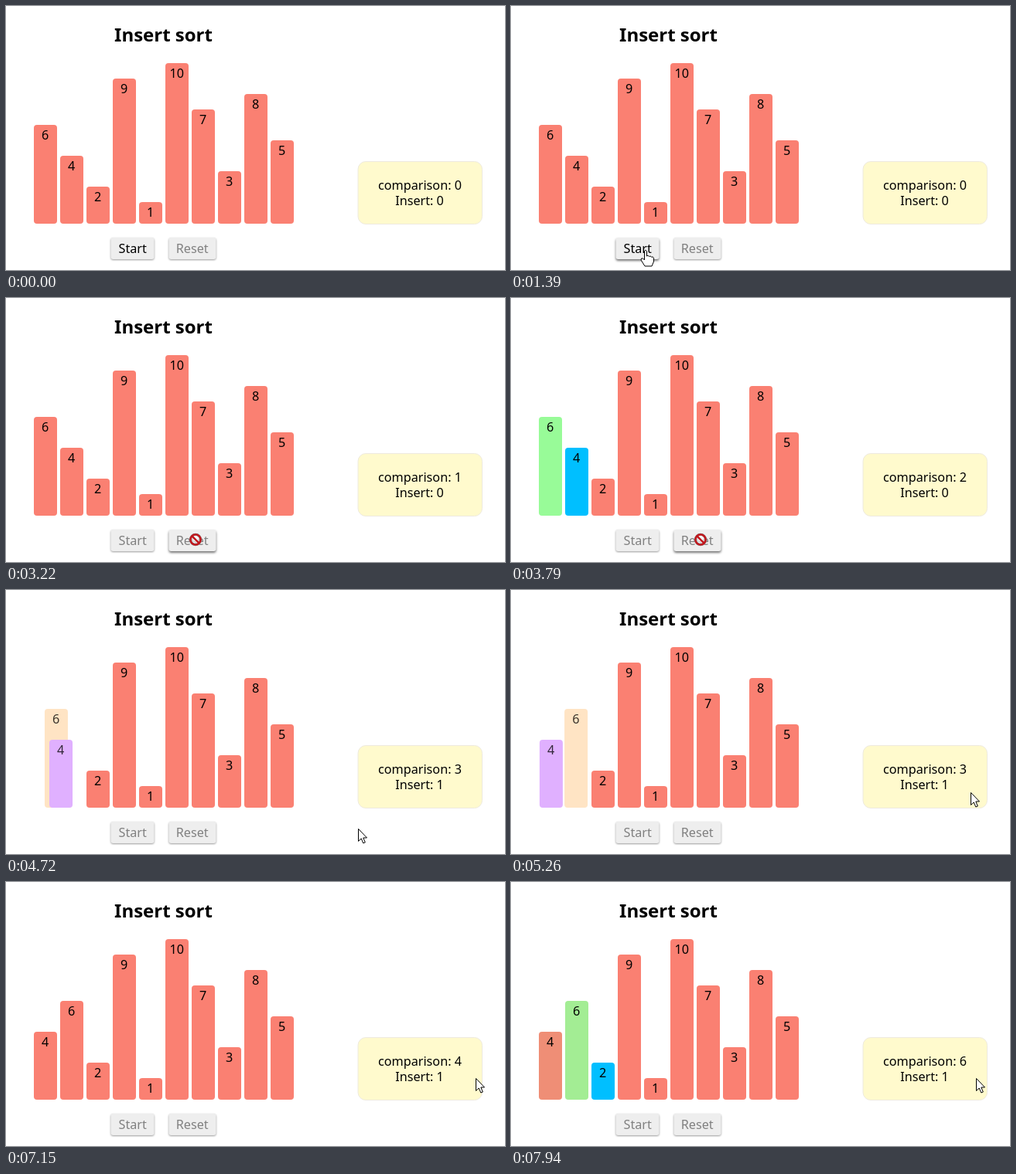
An HTML page for the animation above (8 s loop, 645x342 px).

```html
<!DOCTYPE html>
<html lang="en">
<head>
<meta charset="utf-8">
<title>Insert sort</title>
<style>
  html, body { margin: 0; width: 100%; height: 100%; overflow: hidden; background: #fff; }
  svg { display: block; }
  text { font: 16.2px "Noto Sans", "Open Sans", sans-serif; text-anchor: middle; }
  .title { font-size: 24px; font-weight: bold; }
  .button rect { fill: #eee; filter: drop-shadow(0 1px 1px rgba(0, 0, 0, .4)); }
  .button.hover rect { filter: drop-shadow(0 2px 1.5px rgba(0, 0, 0, .55)); }
  .button text { fill: #808080; }
  .button.enabled text { fill: #000; }
</style>
</head>
<body>
<svg width="645" height="342" viewBox="0 0 645 342">
  <text class="title" x="203.5" y="46">Insert sort</text>
  <g id="bars"></g>
  <g class="button" id="start"><rect x="135.5" y="300" width="56" height="28" rx="3"/><text x="163.7" y="320">Start</text></g>
  <g class="button" id="reset"><rect x="210.5" y="300" width="61" height="28" rx="3"/><text x="240.7" y="320">Reset</text></g>
  <rect x="455" y="201.5" width="160.5" height="81" rx="10" fill="#fffacd" stroke="#eeeade"/>
  <text id="comparison" x="535" y="238"></text>
  <text id="insert" x="534.5" y="258"></text>
  <g id="cursor">
    <path id="arrow" d="M.5 .5V16.5L4.2 13L6.8 19L9.3 18L6.8 12H11.5Z" fill="#fff" stroke="#000"/>
    <path id="hand" d="M-1.5 1.5Q0-1 1.5 1.5V8Q3 6 4.5 8.5Q6 7 7.5 9.2Q9.5 8 10.5 10.5V15L8 21H-1L-6 13Q-6 10-3.5 11L-1.5 13Z" fill="#fff" stroke="#000"/>
    <g id="blocked" fill="none" stroke="#c4161c" stroke-width="2.4">
      <circle r="6.6" fill="#fff" fill-opacity=".6" stroke="#888" stroke-width="3.2"/>
      <circle r="6.6"/>
      <path d="M-4.6-4.6L4.6 4.6"/>
    </g>
  </g>
</svg>
<script>
const LOOP = 8000, FADE = 250, SWAP = 4470, SWAP_TIME = 1000, CLICK = 2210, INSERT = 3890;
const values = [6, 4, 2, 9, 1, 10, 7, 3, 8, 5];
const compareTimes = [CLICK, 3455, INSERT, 6305, 7390, 7940];

const salmon = [250, 128, 114, 1], green = [152, 251, 152, 1], blue = [0, 191, 255, 1];
// The fourth component is the strength of the label.
const peach = [255, 228, 196, .78], lilac = [224, 176, 255, .78];

const fades = {
  6: [[CLICK, green], [2930, salmon], [3455, green], [INSERT, peach], [5715, salmon],
      [6305, green], [6850, salmon], [7390, green], [7913, salmon]],
  4: [[CLICK, blue], [2930, salmon], [3455, blue], [INSERT, lilac], [5715, salmon], [7913, green]],
  2: [[6305, blue], [6850, salmon], [7390, blue]]
};

// time, x, y
const path = [
  [1060, 171, 345], [1200, 176, 306], [1390, 174, 316], [2910, 174, 316], [3220, 245, 313],
  [3790, 245, 313], [4120, 330, 314], [4360, 330, 314], [4720, 455, 309], [5140, 582, 270],
  [5260, 594, 262], [6310, 594, 262], [6470, 610, 238], [6700, 624, 222], [7090, 609, 252],
  [7400, 600, 264], [7720, 601, 254]
];

const $ = id => document.getElementById(id);
const clamp = v => Math.min(1, Math.max(0, v));
const mix = (a, b, p) => a.map((v, i) => v + (b[i] - v) * p);

// CSS "ease": cubic-bezier(.25, .1, .25, 1)
function ease(t) {
  if (t <= 0 || t >= 1) return clamp(t);
  const bezier = (s, a, b) => 3 * a * s * (1 - s) ** 2 + 3 * b * s * s * (1 - s) + s ** 3;
  let lo = 0, hi = 1;
  for (let i = 0; i < 24; i++) {
    const mid = (lo + hi) / 2;
    if (bezier(mid, .25, .25) < t) lo = mid; else hi = mid;
  }
  return bezier(lo, .1, 1);
}

function colorAt(value, t) {
  return (fades[value] || []).reduce(
    (color, [time, next]) => mix(color, next, ease((t - time) / FADE)), salmon);
}

function cursorAt(t) {
  const i = path.findIndex(p => p[0] > t);
  if (i === 0) return [-50, -50];
  if (i < 0) return path[path.length - 1].slice(1);
  const a = path[i - 1], b = path[i];
  return mix(a, b, (t - a[0]) / (b[0] - a[0])).slice(1);
}

$("bars").innerHTML = values.map(v => {
  const h = 20 * v + 8, top = 282 - h;
  return `<g><rect y="${top}" width="30" height="${h}" rx="4"/><text x="14.7" y="${top + 19}">${v}</text></g>`;
}).join("");
const bars = [...$("bars").children];

function drawCursor(t) {
  const [x, y] = cursorAt(t);
  const inside = (left, right) => x > left && x < right && y > 300 && y < 328;
  const onStart = inside(135, 192), onReset = inside(210, 272);
  const shape = !onStart && !onReset ? "arrow" : onStart && t < CLICK ? "hand" : "blocked";
  $("cursor").setAttribute("transform", `translate(${Math.round(x)} ${Math.round(y)})`);
  for (const id of ["arrow", "hand", "blocked"]) $(id).style.display = id === shape ? "" : "none";
  $("start").classList.toggle("hover", onStart);
  $("reset").classList.toggle("hover", onReset);
}

function draw(t) {
  const shift = 34 * ease((t - SWAP) / SWAP_TIME);
  bars.forEach((bar, i) => {
    const [r, g, b, label] = colorAt(values[i], t);
    const x = 36 + 34 * i + (i === 0 ? shift : i === 1 ? -shift : 0);
    bar.setAttribute("transform", `translate(${x} 0)`);
    bar.firstChild.setAttribute("fill", `rgb(${r}, ${g}, ${b})`);
    bar.lastChild.setAttribute("fill-opacity", label);
  });
  $("comparison").textContent = "comparison: " + compareTimes.filter(time => t >= time).length;
  $("insert").textContent = "Insert: " + (t >= INSERT ? 1 : 0);
  $("start").classList.toggle("enabled", t < CLICK);
  drawCursor(t);
}

const began = performance.now();
function tick() {
  draw((performance.now() - began) % LOOP);
  requestAnimationFrame(tick);
}
tick();
</script>
</body>
</html>
```
